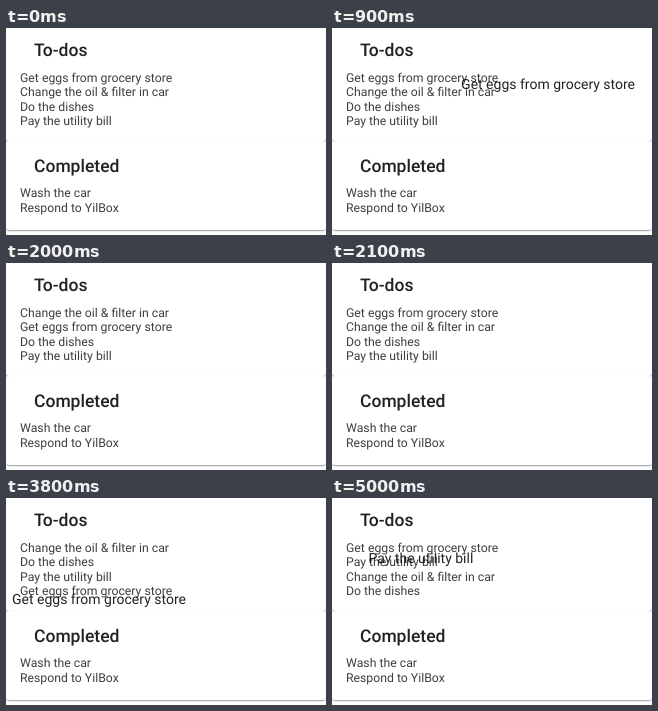
Animation of 320 by 207 pixels, one loop 5.2 s. Source, as an HTML page:

```html
<!DOCTYPE html>
<html lang="en">
<head>
<meta charset="utf-8">
<title>To-dos</title>
<style>
  html, body { margin: 0; width: 100%; height: 100%; overflow: hidden; background: #fdfdfd; }
  .card {
    position: absolute; left: 0; width: 320px; border-radius: 3.5px; background: #fff;
    box-shadow: 0 1.75px .9px -.9px rgba(0,0,0,.2), 0 .9px .9px rgba(0,0,0,.14), 0 .9px 2.6px rgba(0,0,0,.12);
  }
  svg { position: absolute; left: 0; top: 0; }
  text {
    font: 12.25px Roboto, sans-serif; fill: rgba(0,0,0,.76);
    text-rendering: geometricPrecision; white-space: pre;
  }
  text.title { font-size: 17.5px; font-weight: 500; fill: rgba(0,0,0,.87); }
  text.ghost { font-size: 14px; fill: rgba(0,0,0,.87); }
</style>
</head>
<body>
<div class="card" style="top:-4px;height:117px"></div>
<div class="card" style="top:113px;height:88.5px"></div>
<svg width="320" height="207"></svg>
<script>
const LOOP = 5200, STEP = 100, ROW = 14.35, FIRST = 50;
const todos = ['Get eggs from grocery store', 'Change the oil & filter in car',
               'Do the dishes', 'Pay the utility bill'];
const done = ['Wash the car', 'Respond to YilBox'];

// The pointer eases between two points, rests, and the list snaps back one step after the drop.
const drags = [
  { item: 0, start: 500, rest: 1100, drop: 2000, from: [46.6, 50], to: [158, 58] },
  { item: 0, start: 3300, rest: 3800, drop: 3900, from: [7.5, 81], to: [6, 101] },
  { item: 3, start: 4700, rest: 5000, drop: LOOP, from: [17.5, 87], to: [36.5, 60] }
];

const svg = document.querySelector('svg');
const smooth = u => u * u * (3 - 2 * u);

function addText(x, y, words, kind = '') {
  const el = document.createElementNS(svg.namespaceURI, 'text');
  el.setAttribute('x', x);
  el.setAttribute('y', y);
  el.setAttribute('class', kind);
  el.textContent = words;
  svg.append(el);
  return el;
}

addText(28, 28.4, 'To-dos', 'title');
addText(28, 144.3, 'Completed', 'title');
done.forEach((words, i) => addText(14, 169.4 + i * ROW, words));
const rows = todos.map((words, i) => addText(14, FIRST + 3.9 + i * ROW, words));
const ghost = addText(0, 0, '', 'ghost');

function draw(now) {
  const t = Math.floor(now % LOOP / STEP) * STEP;
  const drag = drags.find(d => t >= d.start && t < d.drop + STEP);
  const order = [...todos];
  ghost.textContent = '';
  if (drag) {
    const { item, start, rest, drop, from, to } = drag;
    const p = smooth(Math.min(1, (t - start) / (rest - start)));
    const [x, y] = from.map((a, i) => a + (to[i] - a) * p);
    const slot = Math.min(todos.length - 1, Math.round((y - FIRST) / ROW));
    order.splice(slot, 0, ...order.splice(item, 1));
    if (t < drop) {
      ghost.textContent = todos[item];
      ghost.setAttribute('x', x);
      ghost.setAttribute('y', y + 5);
    }
  }
  rows.forEach((row, i) => row.textContent = order[i]);
}

const begin = performance.now();
function tick() {
  draw(performance.now() - begin);
  requestAnimationFrame(tick);
}
tick();
</script>
</body>
</html>
```
